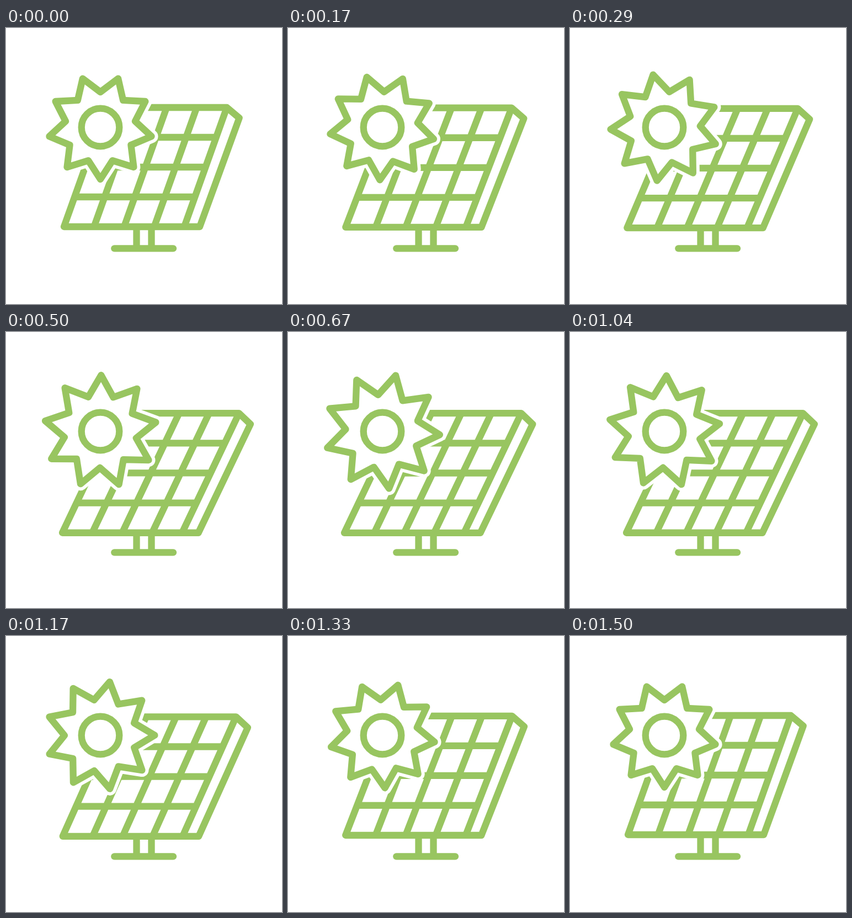
Write an HTML page that moves like this. It is 500 by 500 pixels and loops after 1540 ms.

```html
<!DOCTYPE html>
<html lang="en">
<head>
<meta charset="utf-8">
<title>Solar panel</title>
<style>
  html, body { margin: 0; height: 100%; overflow: hidden; background: #fff; }
  svg { display: block; width: 100vw; height: 100vh; }
  g { fill: none; stroke: #98c560; stroke-width: 12.3; stroke-linejoin: round; }
  .round { stroke-linecap: round; }
  .halo { fill: #fff; stroke: #fff; stroke-width: 24; }
</style>
</head>
<body>
<svg viewBox="0 0 500 500">
  <g>
    <path d="M236.5 362V399M263.5 362V399"/>
    <path class="round" d="M196.3 399.3H303"/>
    <path id="grid"/>
    <path id="frame"/>
    <path id="halo" class="halo"/>
    <path id="star"/>
    <circle cx="171" cy="180" r="34.3"/>
  </g>
</svg>
<script>
const LOOP = 1540, FPS = 24, LAST = 36;
const el = id => document.getElementById(id);
const mix = (a, b, p) => a + (b - a) * p;

// Smoothstep from start to end, clamped outside
function ease(x, start, end) {
  const s = Math.min(1, Math.max(0, (x - start) / (end - start)));
  return s * s * (3 - 2 * s);
}

function drawPanel(p) {
  const left = mix(105, 102, p), right = mix(351, 348.5, p), inner = mix(323, 319, p);
  const top = mix(144, 147.2, p), bottom = mix(360, 363.8, p);
  const corner = mix(400, 422.5, p), lean = corner - inner;
  const step = (inner - left) / 4;
  let d = "";
  for (let i = 1; i < 4; i++) {
    const x = left + i * step, k = i / 4;
    const y = mix(bottom, top, k);
    d += `M${x} ${bottom}L${x + lean} ${top}`;
    d += `M${left + lean * k} ${y}H${inner + lean * k}`;
  }
  d += `M${inner} ${bottom}L${corner} ${top}`;
  el("grid").setAttribute("d", d);
  el("frame").setAttribute("d",
    `M${left} ${bottom}L${left + lean} ${top}H${corner}` +
    `L${mix(422.6, 443.2, p)} ${mix(163, 167, p)}L${right} ${bottom}Z`);
}

function drawSun(turn, grow) {
  const points = [];
  for (let i = 0; i < 18; i++) {
    const a = (90 + turn + i * 20) * Math.PI / 180;
    const r = i % 2 ? 64 + 2.7 * grow : 94 + 10.5 * grow;
    points.push([171 + r * Math.cos(a), 180 + r * Math.sin(a)]);
  }
  const d = "M" + points.join("L") + "Z";
  el("halo").setAttribute("d", d);
  el("star").setAttribute("d", d);
}

function render(now) {
  const n = Math.min(LAST, Math.floor((now % LOOP + 5) * FPS / 1000));
  drawPanel(ease(n, 0, 13) - ease(n, 24, LAST));
  drawSun(80 * ease(n, 0, LAST), ease(n, 0, 18) - ease(n, 18, LAST));
}

const start = performance.now();
function tick() {
  render(performance.now() - start);
  requestAnimationFrame(tick);
}
tick();
</script>
</body>
</html>
```
